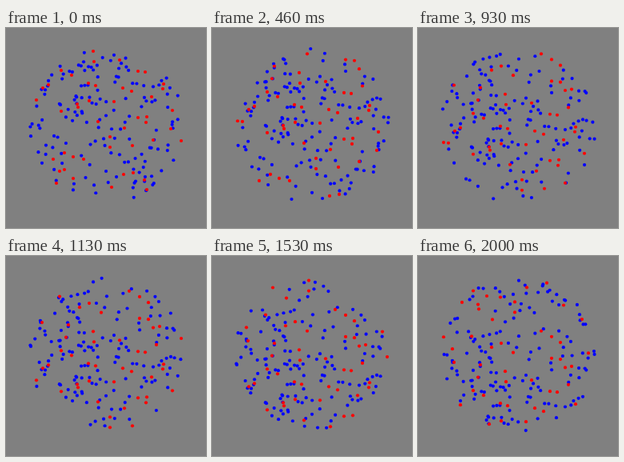
Animation of 250x250 px, one loop 2.06 s. Source, as an HTML page with a canvas:

```html
<!DOCTYPE html>
<html>
<head>
<meta charset="utf-8">
<style>
  html, body { margin: 0; width: 100%; height: 100%; overflow: hidden; background: #808080; }
  canvas { display: block; }
</style>
</head>
<body>
<canvas id="stage" width="250" height="250"></canvas>
<script>
const ctx = document.getElementById('stage').getContext('2d');
const CX = 125.5, CY = 122, R = 97, DOT = 2.1;
const LOOP = 2060, STEP = 3.84, BLUE_COUNT = 149;

// Start positions of the red dots as x, y pairs; the blue ones are random.
const redStarts = [
  109,29, 110,42, 142,40, 69,53, 82,59, 53,71, 46,75, 38,90, 103,69, 112,72,
  89,95, 90,99, 104,91, 69,104, 135,92, 146,75, 157,79, 165,54, 174,55, 182,86,
  197,70, 196,76, 219,141, 208,103, 206,126, 176,111, 165,112, 175,118, 148,125, 115,117,
  130,136, 130,149, 158,147, 159,181, 147,183, 173,190, 176,202, 132,199, 97,164, 73,156,
  84,161, 59,164, 73,177, 67,179, 63,194, 84,188, 184,140
];

let seed = 20177;
const random = () => (seed = (seed * 16807) % 2147483647) / 2147483647;

const dots = [];
for (let i = 0; i < BLUE_COUNT; i++) {
  const angle = random() * 2 * Math.PI, r = R * Math.sqrt(random());
  dots.push({ x: CX + r * Math.cos(angle), y: CY + r * Math.sin(angle), color: '#00f' });
}
for (let i = 0; i < redStarts.length; i += 2) {
  dots.push({ x: redStarts[i], y: redStarts[i + 1], color: '#f00' });
}

// A dot leaving the bottom of the disc comes back at the opposite point on top.
function place({ x, y }, shift) {
  const half = Math.sqrt(Math.max(R * R - (x - CX) ** 2, 1));
  const top = CY - half, travel = y + shift - top;
  const turns = Math.max(0, Math.floor(travel / (2 * half)));
  return [turns % 2 ? 2 * CX - x : x, top + travel - turns * 2 * half];
}

function draw(now) {
  // 15 steps per second, each starting on a whole hundredth of a second.
  const tick = Math.floor((now % LOOP) / 10);
  const step = Math.ceil(3 * (tick + 1) / 20) - 1;
  ctx.fillStyle = '#808080';
  ctx.fillRect(0, 0, 250, 250);
  for (const dot of dots) {
    const [x, y] = place(dot, step * STEP);
    ctx.fillStyle = dot.color;
    ctx.beginPath();
    ctx.arc(x, y, DOT, 0, 2 * Math.PI);
    ctx.fill();
  }
}

let begin;
function run(now) {
  begin ??= now;
  draw(now - begin);
  requestAnimationFrame(run);
}
draw(0);
requestAnimationFrame(run);
</script>
</body>
</html>
```
